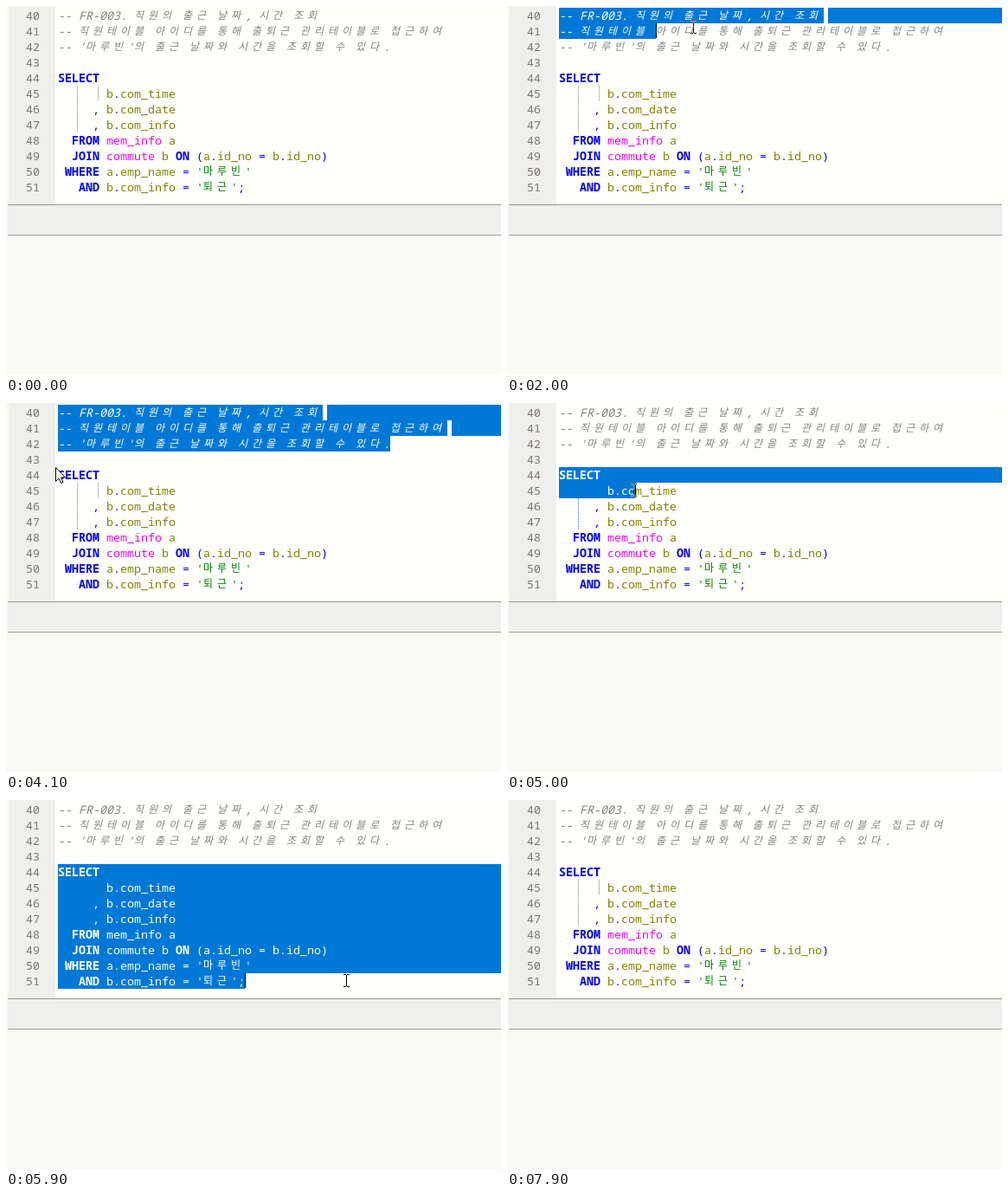
Write an HTML page with a canvas that moves like this. It is 572 px wide and 426 px high and loops after 8000 ms.

```html
<!DOCTYPE html>
<html lang="ko">
<head>
<meta charset="utf-8">
<title>SQL editor</title>
<style>
  html, body { margin: 0; width: 100%; height: 100%; overflow: hidden; background: #f9faf5; }
  canvas { display: block; }
</style>
</head>
<body>
<canvas id="stage" width="572" height="426"></canvas>
<script>
const ctx = document.getElementById('stage').getContext('2d', { alpha: false });
const LOOP = 8000, STEP = 100;
const WIDTH = 572, LEFT = 60, TOP = 2, ROW = 18, CELL = 8, FIRST = 40;
const LATIN = '13.333px "Noto Sans Mono", "DejaVu Sans Mono", monospace';
const HANGUL = '12px "Noto Sans CJK KR", "Noto Sans CJK", sans-serif';

const source = [
  '-- FR-003. 직원의 출근 날짜, 시간 조회',
  '-- 직원테이블 아이디를 통해 출퇴근 관리테이블로 접근하여',
  "-- '마루빈'의 출근 날짜와 시간을 조회할 수 있다.",
  '',
  'SELECT',
  '       b.com_time',
  '     , b.com_date',
  '     , b.com_info',
  '  FROM mem_info a',
  '  JOIN commute b ON (a.id_no = b.id_no)',
  " WHERE a.emp_name = '마루빈'",
  "   AND b.com_info = '퇴근';"
];

const isHangul = ch => ch >= '가' && ch <= '힣';

function styleOf(token) {
  if (token.startsWith('--')) return { color: '#808080', face: 'italic ' };
  if (token[0] === "'") return { color: '#008000', face: '' };
  if (/^[A-Z]+$/.test(token)) return { color: '#0000f0', face: 'bold ' };
  if (/^(mem_info|commute)$/.test(token)) return { color: '#f000f0', face: '' };
  if (/^\w/.test(token)) return { color: '#808000', face: '' };
  return { color: '#0000e0', face: '' };
}

// Each line becomes glyphs on a column grid; Hangul takes two columns.
const lines = source.map(text => {
  const glyphs = [];
  let col = 0;
  for (const token of text.match(/--.*|'[^']*'|\w+|\s+|./g) || []) {
    const style = styleOf(token);
    for (const ch of token) {
      const wide = isHangul(ch);
      glyphs.push({ ch, col, wide, ...style });
      col += wide ? 2 : 1;
    }
  }
  return { glyphs, length: col, comment: text.startsWith('--') };
});

// Paths are [time, x, y].
const mousePath = [
  [1300, 58, 11], [2000, 215, 24], [2500, 452, 46], [3100, 452, 46],
  [4000, 58, 74], [4300, 58, 74], [4600, 61, 83], [5400, 230, 117],
  [5900, 393, 208], [6300, 393, 208], [7000, 208, 180], [7100, 208, 180]
];
const drags = [
  { row: 0, clear: 4300, path: [[1300, 60, 11], [2000, 174, 24], [2500, 452, 46]] },
  { row: 4, clear: 7100, path: [[4600, 60, 83], [5400, 230, 117], [5900, 393, 208]] }
];

function along(path, t) {
  const last = path[path.length - 1];
  if (t >= last[0]) return { x: last[1], y: last[2] };
  const i = path.findIndex(p => p[0] > t);
  const [t0, x0, y0] = path[i - 1], [t1, x1, y1] = path[i];
  const k = (t - t0) / (t1 - t0);
  return { x: x0 + (x1 - x0) * k, y: y0 + (y1 - y0) * k };
}

function selectionAt(t) {
  const drag = drags.find(d => t >= d.path[0][0] && t < d.clear);
  if (!drag) return null;
  const { x, y } = along(drag.path, t);
  const end = Math.floor((y - TOP) / ROW);
  const target = (x - LEFT) / CELL;
  const line = lines[end];
  let col = 0;
  for (const g of line.glyphs) {
    const width = g.wide ? 2 : 1;
    if (target >= g.col + width / 2) col = g.col + width;
  }
  const idle = t - drag.path[drag.path.length - 1][0];
  return { start: drag.row, end, col, caret: idle < 0 || idle % 1060 < 530 };
}

function rect(color, x, y, w, h) {
  ctx.fillStyle = color;
  ctx.fillRect(x, y, w, h);
}

function drawFrame() {
  rect('#f9faf5', 0, 0, WIDTH, 426);
  rect('#efefeb', 3, 0, 54, 229);
  rect('#fffffb', 57, 0, WIDTH - 57, 229);
  rect('#efefed', 2, 229, WIDTH - 2, 36);
  rect('#949494', 2, 229, WIDTH - 2, 1);
  rect('#a0a0a0', 2, 264, WIDTH - 2, 1);
}

function drawSelection(sel) {
  for (let row = sel.start; row <= sel.end; row++) {
    const y = TOP + row * ROW;
    const full = row < sel.end;
    rect('#0078d7', LEFT, y, full ? WIDTH - LEFT : sel.col * CELL, ROW);
    if (full && lines[row].comment) {
      rect('#fffffb', LEFT + lines[row].length * CELL + 2, y, 5, ROW);
    }
  }
}

function drawGuide(x, top, bottom, color) {
  for (let y = top; y < bottom; y += 2) rect(color, x, y, 1, 1);
}

function drawText(sel) {
  lines.forEach((line, row) => {
    const y = TOP + row * ROW + 14;
    ctx.font = LATIN;
    ctx.fillStyle = '#7c7478';
    ctx.fillText(FIRST + row, 23, y);
    const inside = sel && row >= sel.start && row <= sel.end;
    const limit = !inside ? 0 : row < sel.end ? Infinity : sel.col;
    for (const g of line.glyphs) {
      ctx.font = g.face + (g.wide ? HANGUL : LATIN);
      ctx.fillStyle = g.col < limit ? '#fff' : g.color;
      ctx.fillText(g.ch, LEFT + g.col * CELL, g.wide ? y - 1 : y);
    }
  });
}

function drawBeam(x, y) {
  ctx.globalCompositeOperation = 'difference';
  rect('#fff', x, y - 6, 1, 13);
  for (const end of [y - 7, y + 7]) {
    rect('#fff', x - 3, end, 3, 1);
    rect('#fff', x + 1, end, 3, 1);
  }
  ctx.globalCompositeOperation = 'source-over';
}

const arrow = new Path2D('M.5 .5V16.5L4 13L6.5 18.5L9 17.5L6.7 12H11.5Z');

function drawMouse(t) {
  if (t < 1300 || t >= 7100) return;
  const pos = along(mousePath, t);
  const x = Math.round(pos.x), y = Math.round(pos.y);
  if (x >= LEFT || t < 2000) return drawBeam(x, y);
  ctx.save();
  ctx.translate(x - 1, y);
  ctx.fillStyle = '#fff';
  ctx.strokeStyle = '#000';
  ctx.fill(arrow);
  ctx.stroke(arrow);
  ctx.restore();
}

function draw(t) {
  const sel = selectionAt(t);
  drawFrame();
  if (sel) drawSelection(sel);
  const guide = sel && sel.start === 4 ? '#3a6a9a' : '#808080';
  drawGuide(82, 92, 146, guide);
  drawGuide(106, 92, 110, guide);
  drawText(sel);
  if (sel && sel.caret) rect('#000', LEFT + sel.col * CELL, TOP + sel.end * ROW, 1, 17);
  drawMouse(t);
}

const began = performance.now();
function tick() {
  const t = (performance.now() - began) % LOOP;
  draw(Math.floor(t / STEP) * STEP);
  requestAnimationFrame(tick);
}
tick();
</script>
</body>
</html>
```
